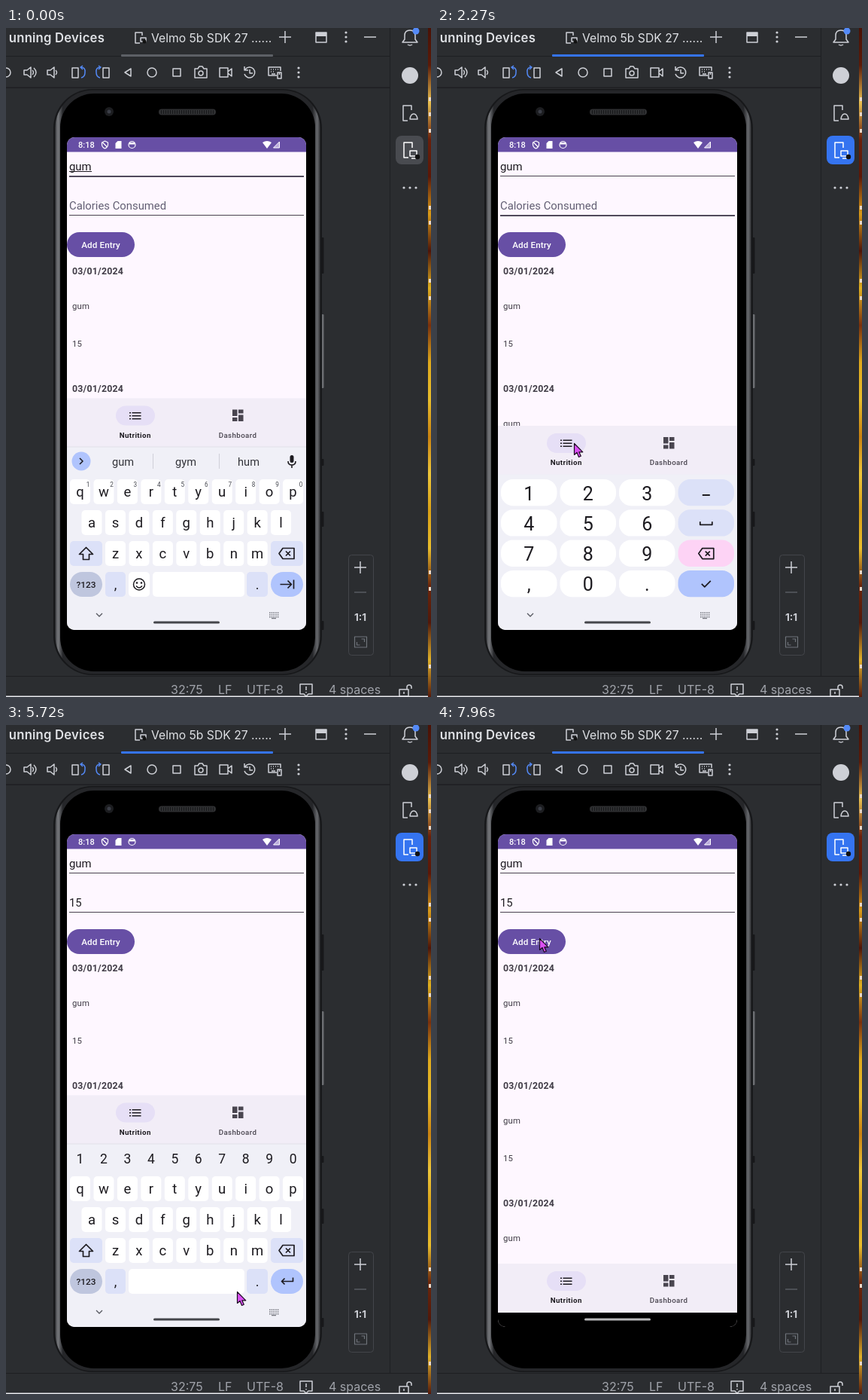
Animation, 565 px wide and 888 px high, one loop 8000 ms. Source, as an HTML page with a canvas:

```html
<!DOCTYPE html>
<html lang="en">
<head>
<meta charset="utf-8">
<title>Emulator: adding a nutrition entry</title>
<style>
html, body { margin: 0; width: 565px; height: 888px; overflow: hidden; background: #2b2d30; }
canvas { display: block; }
</style>
</head>
<body>
<canvas id="stage" width="565" height="888"></canvas>
<script>
const g = document.getElementById('stage').getContext('2d');
const LOOP = 8000;
const IDE = 'Inter, sans-serif', APP = 'Roboto, sans-serif';
const LIGHT = '#ced0d6', DIM = '#6f737a', BLUE = '#3574f0', INK = '#1d1b20';
const PURPLE = '#674fa5', PAPER = '#fef7ff', NAV = '#f2edf7', BOARD = '#f0f0f7';
const KEY = '#ffffff', SIDE = '#dce1f8', ACCENT = '#b0c4fd';

// Moments of the hard changes, in ms
const T = { focus: 1420, field: 1490, numpad: 1700, one: 2820, five: 3960, done: 5320, letters: 5720, hide: 7140 };

// Pointer stops: time, x, y
const POINTER = [
  [130, 480, 676], [470, 470, 11], [730, 470, 11], [870, 121, 255], [1260, 110, 232],
  [1560, 110, 232], [2080, 182, 551], [2270, 182, 551], [2340, 189, 560], [2620, 148, 614],
  [3210, 148, 614], [3350, 182, 644], [3500, 182, 644], [3700, 194, 656], [4560, 194, 656],
  [5120, 337, 740], [5660, 337, 740], [5720, 307, 752], [6400, 124, 765], [6530, 124, 765],
  [6800, 124, 775], [7140, 124, 775], [7900, 136, 286], [7960, 136, 283]
];

const smooth = k => (k = Math.max(0, Math.min(1, k)), k * k * (3 - 2 * k));
const during = (t, from, length) => t >= from && t < from + length;

function box(x, y, w, h, fill, r = 0) {
  g.fillStyle = fill;
  g.beginPath();
  g.roundRect(x, y, w, h, r);
  g.fill();
}

function dot(x, y, r, fill) {
  g.fillStyle = fill;
  g.beginPath();
  g.arc(x, y, r, 0, 7);
  g.fill();
}

function text(s, x, y, font, color, align = 'left', spacing = 0) {
  g.font = font;
  g.letterSpacing = spacing + 'px';
  g.textAlign = align;
  g.fillStyle = color;
  g.fillText(s, x, y);
}

function icon(x, y, d, color = LIGHT, width = 1.5, fill) {
  const path = new Path2D(d);
  g.save();
  g.translate(x, y);
  g.lineJoin = 'round';
  if (fill) { g.fillStyle = fill; g.fill(path); }
  if (width) { g.strokeStyle = color; g.lineWidth = width; g.stroke(path); }
  g.restore();
}

const ring = r => `M${r} 0A${r} ${r} 0 1 1 ${-r} 0A${r} ${r} 0 1 1 ${r} 0`;
const dots = (x, y, dx, dy) => [-1, 0, 1].forEach(i => dot(x + i * dx, y + i * dy, 1.6, LIGHT));

function drawToolbars(active) {
  box(0, 0, 565, 888, '#2b2d30');
  box(0, 37, 510, 1, '#1e1f22');
  box(0, 78.5, 510, 1.5, '#1e1f22');
  box(510, 0, 1, 860, '#1e1f22');
  box(0, 860, 561, 1, '#1e1f22');

  text('unning Devices', 131, 19, `600 16.7px ${IDE}`, '#dfe1e5', 'right', 0.2);
  icon(178, 13, 'M3-3v-4h-9v14h6M1 0h7v5h-7z');
  dot(184, 18, 2.5, '#111');
  text('Velmo 5b SDK 27 ......', 193, 19, `15.7px ${IDE}`, '#dfe1e5');
  box(153, 35, 202, 3, active ? BLUE : '#5d6066', 1);
  icon(371, 12, 'M-8 0H8M0-8V8');
  icon(419, 12, 'M-7-6H7V7H-7z');
  box(412, 6, 14, 5, LIGHT);
  dots(452, 12, 0, 6);
  icon(484, 12, 'M-8 0H8');

  icon(0, 59, 'M0-6A6 6 0 0 1 0 6');
  for (const x of [31, 62]) icon(x, 59, 'M-7-3h4l5-4v14l-5-4h-4z');
  icon(31, 59, 'M4-3q3 3 0 6M6-6q6 6 0 12', LIGHT, 1.4);
  icon(62, 59, 'M4-3q3 3 0 6', LIGHT, 1.4);
  icon(95, 59, 'M-7-6h8v13h-8z');
  icon(97, 59, 'M2-7q7 0 6 7q0 6-5 7M5-9l-3 2 3 3', '#548af7');
  icon(130, 59, 'M-1-6h8v13h-8z');
  icon(128, 59, 'M-2-7q-7 0-6 7q0 6 5 7M-5-9l3 2-3 3', '#548af7');
  icon(162, 59, 'M4-5V5L-4 0z');
  icon(194, 59, ring(6));
  icon(227, 59, 'M-5-5H5V5H-5z');
  icon(259, 59, 'M-8-5h4l2-3h4l2 3h4v12H-8zM3 1a3 3 0 1 1-6 0a3 3 0 1 1 6 0');
  icon(292, 59, 'M-8-6H3V6H-8zM3-1l5-4V5L3 1');
  icon(324, 59, 'M-6-4A7 7 0 1 1-7 2M-7-8v5h5M0-4v5h4');
  icon(357, 58, 'M3 5H-8V-6H8v5M-5-3h1m2 0h1m2 0h1m2 0h1M-5 0h1m2 0h1M-4 3h5M4 1h5v8H4zM6.5 1v3');
  dots(389, 59, 0, 6);

  icon(537, 12, 'M-10 7l3-4v-5q0-7 7-7t7 7v5l3 4zM-3 10q3 2 6 0');
  dot(545, 4, 4.5, '#548af7');
  dot(537, 63, 11, LIGHT);
  icon(536, 113, 'M3-4v-6h-11v20h6M1 8q1-7 5-7t5 7z');
  box(518, 143, 37, 38, active ? BLUE : '#494b50', 8);
  icon(536, 162, 'M4-3v-7h-11v20h6M1 1h9v7h-9zM3 11h6', '#fff');
  dot(547, 171, 3.2, '#111');
  dots(537, 212, 8, 0);
}

function drawEdges() {
  g.strokeStyle = '#43454a';
  g.lineWidth = 1;
  g.beginPath();
  g.roundRect(455.5, 699.5, 33, 133, 4);
  g.stroke();
  icon(471, 716, 'M-8 0H8M0-8V8');
  icon(471, 749, 'M-8 0H8', DIM, 1);
  text('1:1', 471, 787, `700 13.5px ${IDE}`, LIGHT, 'center');
  icon(471.5, 815, 'M-8-7H8V7H-8zM-5 0v4h4M5 0v-4h-4', DIM, 1.2);

  const status = (s, x) => text(s, x, 884, `16px ${IDE}`, '#a0a3aa');
  status('32:75', 219);
  status('LF', 282);
  status('UTF-8', 320);
  status('4 spaces', 429);
  icon(399, 878, 'M-8-7H8V6H3l-3 3-3-3h-5zM0-4v5M0 3v1.5');
  icon(530, 879, 'M-7-1H5V8H-7zM3-1v-3a3 3 0 0 1 6 0v2M-1 2v3');
  box(0, 886.5, 561, 1.5, '#e9e9ee');

  const strip = g.createLinearGradient(0, 0, 0, 888);
  ['#4a1206', '#5a1a08', '#e9c050', '#69200b', '#5a1707', '#d99a18', '#4d1408', '#e0b020', '#79300c',
    '#dfa91c', '#e8bd2c', '#c98210', '#edc63a', '#d9a015', '#e9bd2c', '#6b260b', '#51180a', '#e0b12a', '#56190a']
    .forEach((c, i, all) => strip.addColorStop(i / (all.length - 1), c));
  box(561, 0, 4, 888, strip);
  for (const y of [92, 112, 134, 236, 256, 333, 356, 720, 742, 845]) box(562, y, 3, 5, '#e9d8c8');
}

function drawPhone() {
  for (const [y, h, c] of [[278, 48, '#17181a'], [380, 98, '#6c6e72'], [572, 9, '#17181a'], [642, 20, '#17181a'], [787, 12, '#17181a']])
    box(419, y, 3.5, h, c, 1);
  box(63, 81, 357, 778, '#17181a', 52);
  const rim = g.createLinearGradient(65, 0, 418, 0);
  [[0, '#3a3b3e'], [0.012, '#77797d'], [0.03, '#252629'], [0.97, '#252629'], [0.988, '#66686c'], [1, '#303134']]
    .forEach(([p, c]) => rim.addColorStop(p, c));
  box(65.5, 82.5, 352, 775, rim, 50);
  box(72, 87, 339, 767, '#000', 45);
  dot(137, 111, 6, '#1c1d20');
  dot(137, 111, 2.5, '#3b3e47');
  box(203, 107.5, 76, 8, '#2e2f31', 4);
  for (let x = 206; x < 277; x += 3) box(x, 109, 1, 5, '#17181a');
}

function drawStatusBar() {
  box(81, 145, 318, 19.5, PURPLE);
  text('8:18', 96, 159, `500 11px ${APP}`, '#fff');
  icon(131.5, 155, 'M0-5l4 2v3q0 3-4 5q-4-2-4-5v-3zM-3-3l6 6', '#fff', 1.2);
  icon(149.5, 155, 'M-1-5h5V5h-8v-7z', '#fff', 0, '#fff');
  icon(167.5, 155, ring(4.5), '#fff', 1.2);
  box(164, 152, 7, 2.5, '#fff');
  icon(347, 155, 'M-6-3q6-4 12 0L0 5z', '#fff', 0, '#fff');
  icon(359.5, 155, 'M4-4V4H-4z', '#fff', 1, '#b9aadb');
}

function drawForm(t) {
  const onSecond = t >= T.field && t < T.done + 70;
  const line = (y, thick) => box(84, y, 312, thick ? 2 : 1, thick ? '#504a5b' : '#49454f');
  const entry = (s, y, color = INK) => text(s, 84, y, `14.85px ${APP}`, color);
  const caret = (x, y) => box(x, y, 1.4, 19, INK);

  entry('gum', 189);
  if (t < T.field) {
    box(84, 190, 30, 1, INK);
    if (during(t, 400, 500)) caret(113.3, 174);
  }
  line(196, t < T.field);

  const value = t < T.one + 80 ? '' : t < T.five + 80 ? '1' : '15';
  entry(value || 'Calories Consumed', 241, value ? INK : '#625f73');
  const blink = t < T.one + 80 ? t - T.field : t < T.five + 80 ? t - T.one - 80 : t - T.five - 120;
  if (onSecond && blink % 1000 < 500) caret(84 + value.length * 8.3, 226);
  line(248, onSecond);

  box(81, 271, 90, 33, PURPLE, 16.5);
  text('Add Entry', 126, 292, `500 11.7px ${APP}`, '#fff', 'center', 0.1);
}

function drawList() {
  for (let y = 327; y < 720; y += 156) {
    text('03/01/2024', 88, y, `700 12.3px ${APP}`, '#413d47', 'left', 0.25);
    text('gum', 88, y + 46, `11.34px ${APP}`, '#413d47', 'left', 0.2);
    text('15', 88, y + 96, `11.34px ${APP}`, '#413d47', 'left', 0.2);
  }
}

function drawNav(top) {
  box(81, top, 318, 65, NAV);
  box(146, top + 10, 52, 26, '#e6dff6', 13);
  for (let i = 0; i < 3; i++) {
    box(164, top + 18.5 + i * 4, 2, 1.6, INK);
    box(167.5, top + 18.5 + i * 4, 12, 1.6, INK);
  }
  for (const [x, y, h] of [[301, 15, 8.5], [309, 15, 5], [301, 25.5, 5], [309, 22, 8.5]]) box(x, top + y, 6.5, h, '#49454f');
  text('Nutrition', 171.7, top + 52, `700 9.72px ${APP}`, INK, 'center', 0.4);
  text('Dashboard', 308, top + 52, `500 9.72px ${APP}`, '#49454f', 'center', 0.4);
}

const backspace = (x, y) => icon(x, y, 'M-10 0l5-7H10V7H-5zM-1-3l6 6M5-3l-6 6', INK, 1.7);

function drawLetters(full) {
  const step = 31.45;
  const row = (chars, x, y, size = 18.5) => [...chars].forEach((c, i) => {
    if (size > 18) box(x + i * step - 13.5, y - 16.5, 27, 33, KEY, 5);
    text(c, x + i * step, y + 6, `${size}px ${APP}`, INK, 'center');
  });
  box(81, 555.5, 318, 1, '#e4e2ea');
  row('qwertyuiop', 98.5, 615.5);
  row('asdfghjkl', 114, 656.5);
  row('zxcvbnm', 145.5, 697.5);
  if (full) {
    dot(100, 575, 12.5, ACCENT);
    icon(100, 575, 'M-2-4l4 4-4 4', INK, 1.6);
    ['gum', 'gym', 'hum'].forEach((s, i) => text(s, 155.5 + i * 83.5, 580.5, `14.6px ${APP}`, '#33343a', 'center'));
    for (const x of [195, 283]) box(x, 565, 1, 20, '#cfcfd8');
    box(377.5, 567, 5, 10, INK, 2.5);
    icon(380, 575, 'M-5 0q0 5 5 5t5-5M0 5v4', INK, 1.6);
    [...'1234567890'].forEach((c, i) => text(c, 109 + i * step, 608.5, `8.2px ${APP}`, '#44464f', 'center'));
  } else {
    row('1234567890', 98.5, 576, 17.5);
  }
  box(85, 681, 43, 33, SIDE, 5);
  icon(106.5, 697.5, 'M0-8l9 9h-5v7h-8v-7h-5z', INK, 1.7);
  box(352, 681, 43, 33, SIDE, 5);
  backspace(373, 697.5);
  box(85, 722, 43, 33, '#bfc6de', 16.5);
  text('?123', 106.5, 743, `500 11.8px ${APP}`, INK, 'center');
  box(132, 722, 27, 33, SIDE, 5);
  text(',', 145.5, 745, `18px ${APP}`, INK, 'center');
  box(full ? 195 : 163, 722, full ? 122 : 154, 33, KEY, 5);
  if (full) {
    box(163, 722, 28, 33, KEY, 5);
    icon(177, 738.5, ring(7.5) + 'M-4 2q4 5 8 0', INK, 1.5);
    dot(174, 736.5, 1.3, INK);
    dot(180, 736.5, 1.3, INK);
  }
  box(320, 722, 28, 33, SIDE, 5);
  text('.', 334, 745, `18px ${APP}`, INK, 'center');
  box(352, 722, 43, 33, ACCENT, 16.5);
  icon(373.5, 738.5, full ? 'M-9 0H5M1-5l5 5-5 5M9-6V6' : 'M8-5v5H-7M-3-4l-4 4 4 4', INK, 1.7);
}

function drawNumpad(t) {
  const pressed = during(t, T.one, 150) ? '1' : during(t, T.five, 120) ? '5' : during(t, T.done, 120) ? '+' : '';
  [...'123-456_789<,0.+'].forEach((c, i) => {
    const x = 85 + i % 4 * 78.5, y = 599 + (i >> 2) * 40.3;
    const fill = { '-': SIDE, '_': SIDE, '<': '#fdd3f5', '+': ACCENT }[c] || KEY;
    box(x, y, 74.5, 35.3, fill, 16);
    if (c === pressed) box(x, y, 74.5, 35.3, 'rgba(40,45,70,.14)', 16);
    const cx = x + 37.3, cy = y + 18;
    if (c === '-') icon(cx, cy + 3, 'M-5 0H5', INK, 1.8);
    else if (c === '_') icon(cx, cy, 'M-8-2v4H8v-4', INK, 1.8);
    else if (c === '<') backspace(cx, cy);
    else if (c === '+') icon(cx, cy, 'M-6 0l4 4 8-8', INK, 1.8);
    else text(c, cx, cy + 9.5, `25px ${APP}`, INK, 'center');
  });
}

function drawKeyboard(t) {
  const numeric = t >= T.numpad && t < T.letters;
  const slide = 250 * smooth((t - T.hide) / 260);
  g.save();
  g.translate(0, slide);
  box(81, numeric ? 592.5 : 556, 318, 260, BOARD);
  if (numeric) drawNumpad(t);
  else drawLetters(t < T.numpad);
  icon(124, 779, 'M-4-2l4 4 4-4', '#55575f', 1.3);
  for (let r = 0; r < 3; r++)
    for (let c = 0; c < 5; c++) box(350 + c * 2.7, 775.5 + r * 2.7, 1.6, 1.6, '#74767e');
  box(353, 783, 6, 1.2, '#74767e');
  g.restore();
}

function drawScreen(t) {
  g.save();
  g.beginPath();
  g.roundRect(81, 145, 318, 654, 10);
  g.clip();
  box(81, 145, 318, 654, PAPER);
  drawStatusBar();
  drawForm(t);
  drawList();
  const hiding = t >= T.hide;
  drawNav(hiding ? 715 : t >= T.numpad && t < T.letters ? 528 : 491.5);
  if (hiding) box(81, 780, 318, 19, '#000');
  if (t < T.hide + 260) drawKeyboard(t);
  box(196, 787.5, 88, 3, t < T.hide + 200 ? '#45464b' : '#b8b8ba', 1.5);
  g.restore();
}

function drawPointer(t) {
  if (t < POINTER[0][0]) return;
  let i = POINTER.findIndex(p => p[0] > t);
  if (i < 0) i = POINTER.length - 1;
  const [t0, x0, y0] = POINTER[i - 1], [t1, x1, y1] = POINTER[i];
  const k = smooth((t - t0) / (t1 - t0));
  icon(x0 + (x1 - x0) * k, y0 + (y1 - y0) * k,
    'M.5 .5V15.5L4 12.5L6.5 18.5L9.3 17.3L6.8 11.8H11.8z', '#1b0b20', 1.2, '#da50f2');
}

function frame() {
  const t = performance.now() % LOOP;
  drawToolbars(t >= T.focus);
  drawEdges();
  drawPhone();
  drawScreen(t);
  drawPointer(t);
  requestAnimationFrame(frame);
}
frame();
</script>
</body>
</html>
```
